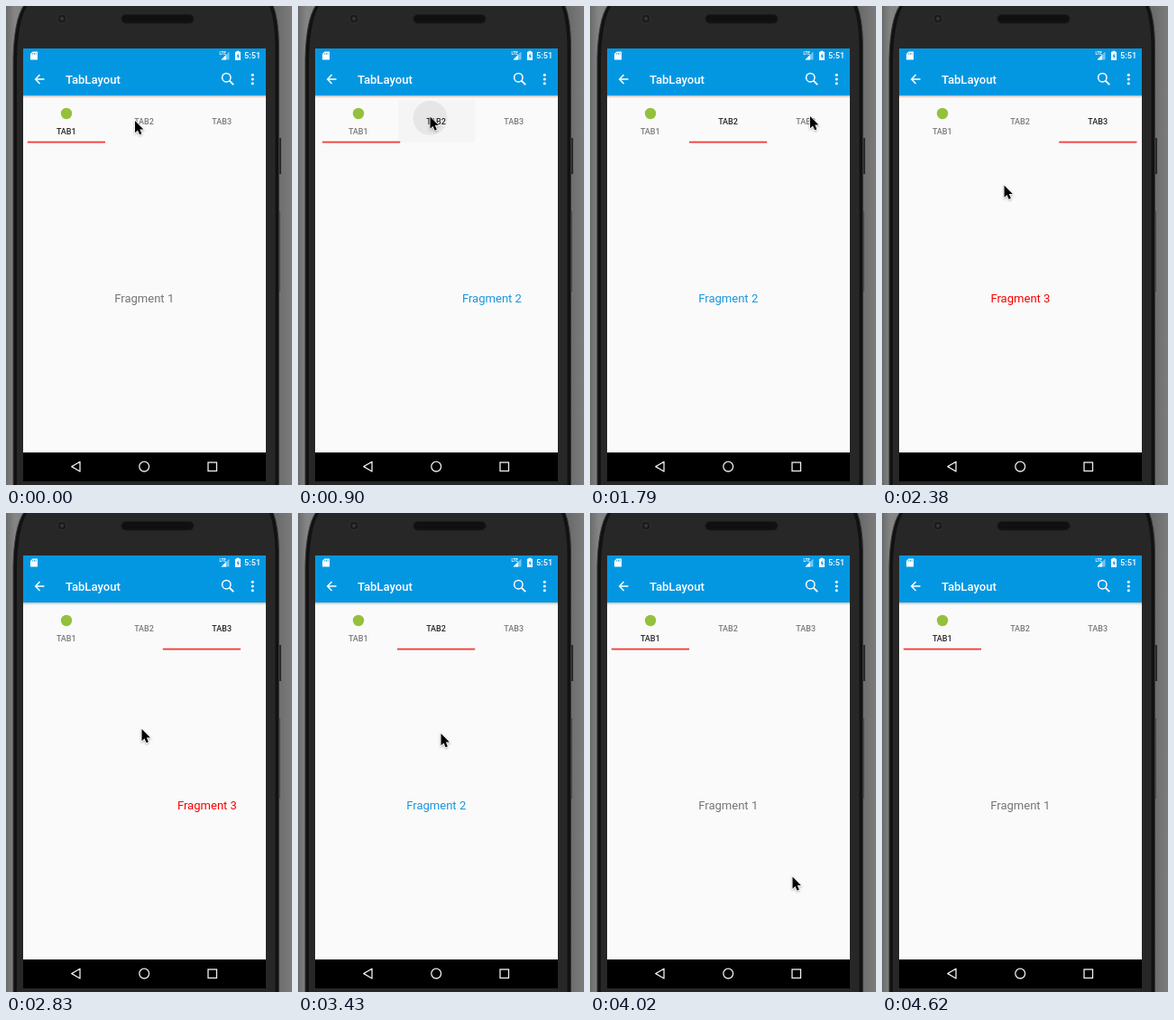
An HTML page for the animation above (4770 ms loop, 317 by 530 pixels).

```html
<!DOCTYPE html>
<html lang="en">
<head>
<meta charset="utf-8">
<title>TabLayout</title>
<style>
html, body { margin: 0; width: 100%; height: 100%; overflow: hidden; background: #777; }
svg { display: block; width: 100%; height: 100%; }
text { font-family: Roboto, "Noto Sans", sans-serif; }
.tab { font-size: 9px; font-weight: 500; text-anchor: middle; }
.page { font-size: 13.05px; text-anchor: middle; }
#cursor { filter: drop-shadow(0 1px 1px rgba(0, 0, 0, .3)); }
</style>
</head>
<body>
<svg viewBox="0 0 317 530">
  <defs>
    <linearGradient id="wall">
      <stop offset="0" stop-color="#6b6b6b"/><stop offset=".03" stop-color="#858585"/>
      <stop offset=".95" stop-color="#6c6c6c"/><stop offset="1" stop-color="#7c7c7c"/>
    </linearGradient>
    <linearGradient id="shade" x2="0" y2="1">
      <stop offset="0" stop-color="#000" stop-opacity=".24"/><stop offset="1" stop-color="#000" stop-opacity="0"/>
    </linearGradient>
    <clipPath id="screen"><rect x="19" y="99" width="269" height="395"/></clipPath>
    <clipPath id="cell"><rect id="cellBox" y="104" width="85" height="47"/></clipPath>
  </defs>

  <!-- phone -->
  <rect width="317" height="530" fill="url(#wall)"/>
  <path d="M302 146h3v40h-3zM302 227h1.500v89h-1.500z" fill="#2a2a2a"/>
  <path d="M8 531V58Q9 15 20 -1H296Q302 14 302.500 42V531Z" fill="#121212" stroke="#3c3c3c"/>
  <path d="M12 530V60Q13 18 23 0H292Q298 16 298.500 44V530Z" fill="#272727"/>
  <rect x="128" y="9.500" width="80" height="9.500" rx="4.700" fill="#101010" stroke="#1b1b1b"/>
  <circle cx="62" cy="14" r="5" fill="#1b1b1b" stroke="#333"/>
  <circle cx="62" cy="14" r="2" fill="#34363c"/>

  <rect x="19" y="47" width="269" height="447" fill="#fafafa"/>
  <rect x="19" y="494" width="269" height="32" fill="#000"/>
  <rect x="19" y="99" width="269" height="3" fill="url(#shade)"/>
  <rect x="19" y="47" width="269" height="52" fill="#0397e2"/>

  <!-- status bar and toolbar -->
  <g fill="#fff">
    <path d="M29.500 50.500H35V59.500H27V53Z"/>
    <path d="M29.700 52v1.700M31.500 52v1.700M33.200 52v1.700" stroke="#0397e2" stroke-width=".8"/>
    <path d="M247.500 50.500V59.500H238.500Z" opacity=".45"/>
    <path d="M244 54V59.500H238.500Z"/>
    <text x="236.500" y="54" font-size="4.500" font-weight="700">LTE</text>
    <path d="M255.500 50.800V49.800H258.500V50.800H260V60H254V50.800Z"/>
    <path d="M257.600 52.300L255.500 55.800H256.800V58.500L258.700 55H257.600Z" fill="#0397e2"/>
    <text x="264" y="58.300" font-size="9.200" font-weight="500">5:51</text>
    <text x="66" y="85.700" font-size="13.100" font-weight="500">TabLayout</text>
    <circle cx="273.300" cy="76.300" r="1.500"/>
    <circle cx="273.300" cy="81" r="1.500"/>
    <circle cx="273.300" cy="85.700" r="1.500"/>
  </g>
  <g fill="none" stroke="#fff" stroke-width="1.500">
    <path d="M42.500 81H33M37.500 76L32.700 81L37.500 86"/>
    <circle cx="244.300" cy="79.200" r="4.700"/>
    <path d="M247.700 82.600L252.200 87.100" stroke-width="2"/>
  </g>
  <g fill="none" stroke="#eee" stroke-width="1.300">
    <path d="M82 504.300V515L72.800 509.600Z" stroke-linejoin="round"/>
    <circle cx="153.200" cy="509.600" r="5.400"/>
    <rect x="224" y="505" width="9.500" height="9.500"/>
  </g>

  <!-- tabs and pages -->
  <g id="press" clip-path="url(#cell)">
    <rect x="19" y="104" width="269" height="47" fill="#f5f5f5"/>
    <circle id="ripple" cy="124" fill="#e6e6e6"/>
  </g>
  <circle cx="67" cy="119" r="6.200" fill="#95c03c"/>
  <g id="tabs"></g>
  <rect id="bar" y="149.700" width="86.200" height="1.800" fill="#f63a36"/>
  <g id="pages" clip-path="url(#screen)"></g>

  <path id="cursor" d="M0 0V13.200L3 10.400L5.100 15.300L7.400 14.300L5.300 9.500H9.400Z" fill="#000" stroke="#fff" stroke-width="1.500" paint-order="stroke"/>
</svg>
<script>
// The loop is cut into equal beats; the picture is refreshed once per beat.
const LOOP = 4770, BEATS = 32, LEAD = 8;
const WIDTH = 269, MID = 153.2, CELL = 86.2;
const TAPS = [6, 14], SWIPES = [18, 23];

// Pointer stops: [beat, x, y]
const STOPS = [[0, 143, 127], [1, 146.5, 122.5], [9, 146.5, 122.5], [12, 244, 122],
  [14, 244, 122], [16, 135.5, 198.5], [18, 104, 238], [20, 197, 240],
  [23, 158.5, 244], [27, 224.5, 402.5], [29, 241.5, 511.5], [31, 303, 535]];

const el = id => document.getElementById(id);
const clamp = v => Math.max(0, Math.min(1, v));
const mix = (a, b, u) => a + (b - a) * u;
const sum = (list, fn) => list.reduce((total, v) => total + fn(v), 0);
const set = (node, attrs) => {
  for (const name in attrs) node.setAttribute(name, attrs[name]);
  return node;
};

function addText(parent, cls, label, x, y, fill) {
  const node = document.createElementNS("http://www.w3.org/2000/svg", "text");
  node.textContent = label;
  el(parent).append(node);
  return set(node, { class: cls, x, y, fill });
}

const tabs = [0, 1, 2].map(i =>
  addText("tabs", "tab", "TAB" + (i + 1), 66.8 + i * CELL, i ? 131.4 : 142, "#777"));
const pages = ["#757575", "#1b95dd", "#fb0000"].map((color, i) =>
  addText("pages", "page", "Fragment " + (i + 1), MID, 327.5, color));

// A tap moves the page early and the bar a little later; a swipe moves both.
const settle = d => d < 0 ? 0 : 1 - (1 - clamp((d + 1.02) / 4)) ** 5;
const slide = d => d < 0 ? 0 : 1 - (1 - clamp((d + .2) / 2) ** 1.9) ** 3;
const swipe = d => { const u = clamp(d / 3); return u * u * (3 - 2 * u); };

function pointer(beat) {
  const i = STOPS.findLastIndex(s => s[0] <= beat);
  const a = STOPS[i], b = STOPS[i + 1] || a;
  const u = (beat - a[0]) / (b[0] - a[0] || 1);
  return [mix(a[1], b[1], u), mix(a[2], b[2], u)];
}

function draw(time) {
  const beat = Math.floor((time + LEAD) * BEATS / LOOP) % BEATS;
  const back = sum(SWIPES, s => swipe(beat - s));
  const page = sum(TAPS, s => settle(beat - s)) - back;
  const bar = sum(TAPS, s => slide(beat - s)) - back;
  const active = Math.round(page);

  pages.forEach((node, i) => set(node, { x: MID + (i - page) * WIDTH }));
  tabs.forEach((node, i) => set(node, { fill: i === active ? "#262626" : "#7a7a7a" }));
  set(el("bar"), { x: 23.8 + bar * CELL });

  const [x, y] = pointer(beat);
  set(el("cursor"), { transform: `translate(${x} ${y})` });

  const tap = TAPS.findLast(s => s <= beat);
  const age = beat - tap;
  set(el("press"), { opacity: age < 2 ? 1 - age / 2 : 0 });
  if (age < 2) {
    set(el("cellBox"), { x: 25 + active * CELL });
    set(el("ripple"), { cx: x, r: 19 + age * 15 });
  }
}

const start = performance.now();
function tick() {
  draw((performance.now() - start) % LOOP);
  requestAnimationFrame(tick);
}
draw(0);
requestAnimationFrame(tick);
</script>
</body>
</html>
```
